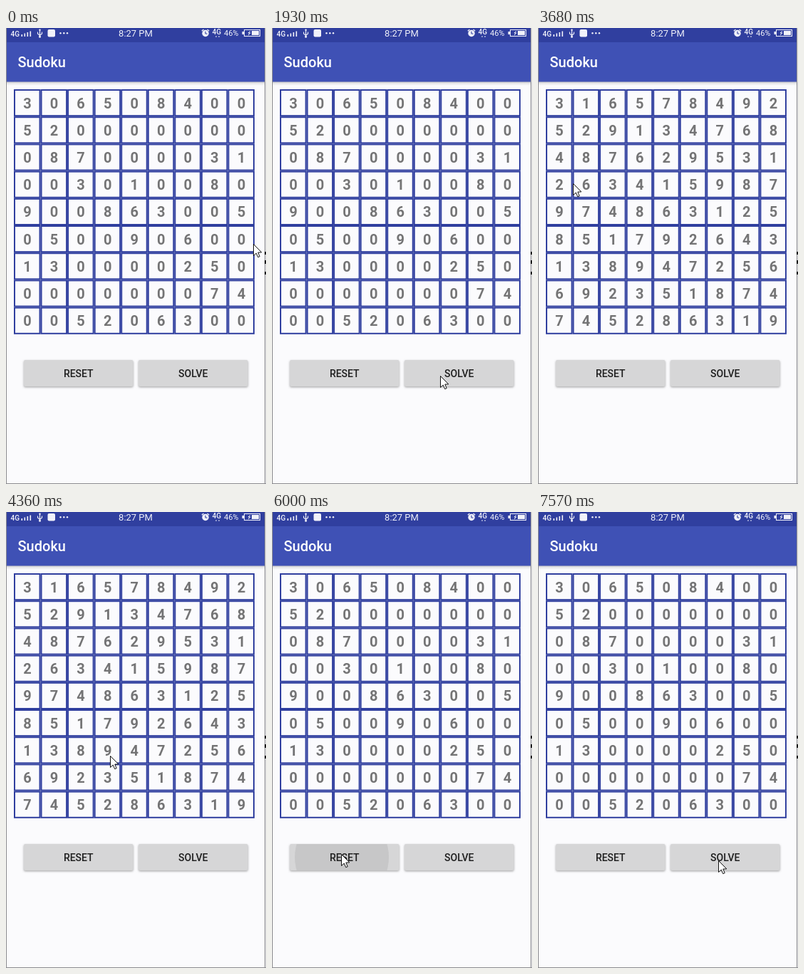
These frames come from a looping animation (365x640 px, 8000 ms). An HTML page with a canvas:

```html
<!DOCTYPE html>
<html lang="en">
<head>
<meta charset="utf-8">
<title>Sudoku solver</title>
<style>
html, body { margin: 0; width: 100%; height: 100%; overflow: hidden; background: #fbfbfd; }
canvas { display: block; }
</style>
</head>
<body>
<canvas id="stage" width="365" height="640"></canvas>
<script>
const ctx = document.getElementById('stage').getContext('2d');
const LOOP = 8000;
const INDIGO = '#303f9f';

const PUZZLE = [
  '306508400', '520000000', '087000031', '003010080', '900863005',
  '050090600', '130000250', '000000074', '005206300'
];
const SOLUTION = [
  '316578492', '529134768', '487629531', '263415987', '974863125',
  '851792643', '138947256', '692351874', '745286319'
];

const RESET = { label: 'RESET', x: 25, press: [5720, 6000] };
const SOLVE = { label: 'SOLVE', x: 186, press: [2070, 2590] };

// Pointer tip: [time, x, y], held until the next entry
const POINTER = [
  [0, 347, 303], [740, 345, 326], [860, 333, 392], [990, 314, 460],
  [1130, 290, 476], [1250, 252, 485], [1370, 226, 488], [1930, 236, 488],
  [2860, 252, 464], [2980, 284, 407], [3130, 298, 184], [3280, 262, 78],
  [3400, 160, 63], [3530, 77, 161], [3680, 49, 218], [3830, 150, 323],
  [3970, 188, 290], [4090, 212, 250], [4240, 190, 296], [4360, 146, 342],
  [4480, 117, 383], [4630, 109, 409], [4780, 100, 452], [4900, 97, 476],
  [5050, 97, 478], [5170, 97, 480], [6600, 97, 481], [6880, 96, 482],
  [7180, 150, 484], [7300, 221, 485], [7450, 243, 487], [7570, 253, 489]
];

// Touch ripples: [time, button, centre x, radius, opacity]
const RIPPLES = [
  [0, null], [2190, SOLVE, 238, 30, 0.04], [2590, SOLVE, 247, 90, 0.065],
  [2860, SOLVE, 250, 100, 0.025], [2980, null],
  [5720, RESET, 98, 22, 0.04], [6000, RESET, 98, 66, 0.07], [6450, null]
];

const heldAt = (steps, t) => steps.filter(s => s[0] <= t).pop();

function rect(color, x, y, w, h) {
  ctx.fillStyle = color;
  ctx.fillRect(x, y, w, h);
}

function text(str, x, y, font, color, align = 'center') {
  ctx.font = font + ' Roboto, sans-serif';
  ctx.textAlign = align;
  ctx.fillStyle = color;
  ctx.fillText(str, x, y);
}

function disc(x, y, r, color) {
  ctx.fillStyle = color;
  ctx.beginPath();
  ctx.arc(x, y, r, 0, Math.PI * 2);
  ctx.fill();
}

function line(points, color, width) {
  ctx.strokeStyle = color;
  ctx.lineWidth = width;
  ctx.beginPath();
  points.forEach(([x, y]) => ctx.lineTo(x, y));
  ctx.stroke();
}

function statusBar() {
  const ink = '#f1f2fa';
  rect(INDIGO, 0, 0, 365, 20);
  text('4G', 6.5, 12, '500 10px', ink, 'left');
  [3, 4.5, 6, 7.5].forEach((h, i) => rect(ink, 21.5 + i * 4, 12 - h, 1.6, h));

  // USB trident
  line([[47.5, 3], [47.5, 12]], ink, 1.2);
  line([[44.5, 5.5], [44.5, 8], [47.5, 10.5], [50.5, 8], [50.5, 5.5]], ink, 1.1);
  disc(47.5, 12.2, 1.5, ink);
  disc(47.5, 2.7, 1.2, ink);

  ctx.fillStyle = ink;
  ctx.beginPath();
  ctx.roundRect(58.5, 2, 10.5, 10.5, 2);
  ctx.fill();
  [76.5, 81.3, 86].forEach(x => disc(x, 7.3, 1.2, ink));

  text('8:27 PM', 182, 12, '13px', ink);

  // Alarm clock
  disc(280, 7.5, 4.7, ink);
  line([[274.8, 4.2], [277.5, 2]], ink, 1.3);
  line([[282.5, 2], [285.2, 4.2]], ink, 1.3);
  line([[280, 4.8], [280, 7.8], [282.5, 8.3]], INDIGO, 1.1);

  text('4G', 289.5, 9, '500 10px', ink, 'left');
  rect('#8d96cc', 294, 11, 2, 2);
  rect('#8d96cc', 298, 11, 2, 2);
  text('46%', 306, 11.3, '11px', ink, 'left');

  // Battery
  ctx.strokeStyle = ink;
  ctx.lineWidth = 1;
  ctx.strokeRect(334.5, 2.5, 22, 9);
  rect(ink, 331.5, 5, 2.5, 4);
  rect(ink, 345, 4, 10, 6);
  line([[343, 4.5], [340, 7], [343, 7], [340, 10]], ink, 1);
}

function appBar() {
  const shade = ctx.createLinearGradient(0, 75, 0, 81);
  shade.addColorStop(0, 'rgba(0,0,0,.26)');
  shade.addColorStop(0.4, 'rgba(0,0,0,.09)');
  shade.addColorStop(1, 'rgba(0,0,0,0)');
  rect(shade, 0, 75, 365, 6);
  rect('#3f51b5', 0, 20, 365, 55.5);
  text('Sudoku', 16.5, 55, '500 20px', '#fff', 'left');
}

function grid(rows) {
  const w = 37.55, h = 38.2;
  rows.forEach((row, r) => [...row].forEach((digit, c) => {
    const x = 11 + c * w, y = 86 + r * h;
    ctx.strokeStyle = INDIGO;
    ctx.lineWidth = 2;
    ctx.strokeRect(x + 1, y + 1, w - 2, h - 2);
    text(digit, x + w / 2 + 0.2, y + 26.5, 'bold 20px', '#747475');
  }));
}

function button({ label, x, press }, ripple, t) {
  const y = 466, w = 153.5, h = 37;
  const pressed = t >= press[0] && t < press[1];
  ctx.save();
  ctx.shadowColor = pressed ? 'rgba(0,0,0,.42)' : 'rgba(0,0,0,.34)';
  ctx.shadowBlur = pressed ? 6 : 3;
  ctx.shadowOffsetY = pressed ? 3 : 1.3;
  ctx.fillStyle = '#d6d6d7';
  ctx.beginPath();
  ctx.roundRect(x, y, w, h, 2);
  ctx.fill();
  ctx.restore();

  if (ripple[1] && ripple[1].label === label) {
    const [, , cx, radius, alpha] = ripple;
    ctx.save();
    ctx.clip();
    disc(cx, y + h / 2, radius, `rgba(0,0,0,${alpha})`);
    ctx.restore();
  }
  text(label, x + w / 2, 489.5, '500 14px', '#1f1f1f');
}

function windowEdge() {
  rect('#8b8b8f', 0, 0, 1, 640);
  rect('#8b8b8f', 363, 0, 1, 640);
  rect('#e4e4e8', 364, 0, 1, 640);
  rect('#8b8b8f', 0, 639, 365, 1);
  [[314, 4], [326, 5], [342, 4]].forEach(([y, h]) => rect('#1c1c1c', 363, y, 2, h));
}

function pointer(x, y) {
  const shape = [[0, 0], [0, 16], [3.8, 12.6], [6.2, 18.2], [8.7, 17.2], [6.3, 11.6], [11.3, 11.4]];
  ctx.beginPath();
  shape.forEach(([dx, dy]) => ctx.lineTo(x + 0.5 + dx, y + 0.5 + dy));
  ctx.closePath();
  ctx.fillStyle = '#fff';
  ctx.fill();
  ctx.strokeStyle = '#111';
  ctx.lineWidth = 1;
  ctx.stroke();
}

function draw(t) {
  const ripple = heldAt(RIPPLES, t);
  const solved = t >= 2590 && t < 6000;
  rect('#fbfbfd', 0, 0, 365, 640);
  statusBar();
  appBar();
  grid(solved ? SOLUTION : PUZZLE);
  button(RESET, ripple, t);
  button(SOLVE, ripple, t);
  windowEdge();
  const [, x, y] = heldAt(POINTER, t);
  pointer(x, y);
}

const start = performance.now();
function tick() {
  draw((performance.now() - start) % LOOP);
  requestAnimationFrame(tick);
}
tick();
</script>
</body>
</html>
```
